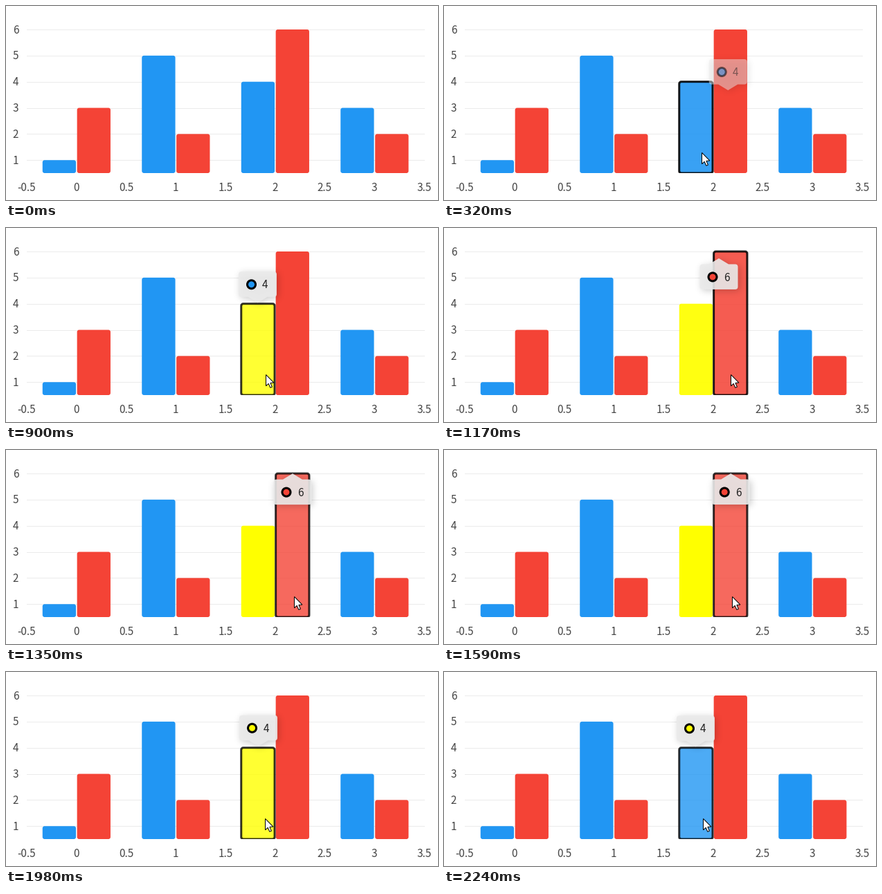
A matplotlib script for the animation above (2350 ms loop, 624 by 281 pixels).

```python
import numpy as np
import matplotlib.pyplot as plt
from matplotlib.animation import FuncAnimation
from matplotlib.patches import Circle, FancyBboxPatch, PathPatch, Polygon, Rectangle
from matplotlib.path import Path
from matplotlib.transforms import Affine2D

W, H, DPI = 624, 281, 100
LOOP, STEP = 2350, 10
PX = 72 / DPI
BLUE, RED, YELLOW = "#2196f3", "#f44336", "#ffff00"
FADE = 340

# Pointer and hover timeline, in ms
ENTER, TO_RED, TO_FIRST = 243, 1067, 1733
CLICKS = [(690, 780), (2140, 2240)]
POINTER = np.array([
    (20, 482, 270), (120, 437, 246), (240, 389, 219), (320, 372, 211.5),
    (460, 375, 212), (960, 375, 212), (1060, 396, 212), (1170, 413.5, 212),
    (1300, 416.5, 212), (1690, 416.5, 212), (1735, 388, 213),
    (1790, 376.5, 213), (1900, 374.5, 212.5),
])
TIP_START, TIP_FIRST, TIP_RED = map(np.array, [(437, 93), (336, 63.3), (386.7, 34)])

fig = plt.figure(figsize=(W / DPI, H / DPI), dpi=DPI, facecolor="white")
ax = fig.add_axes([0, 0, 1, 1])
ax.axis("off")
ax.set_xlim(0, W)
ax.set_ylim(H, 0)


def x_pos(value):
    return 30 + 143.5 * (value + 0.5)


def y_pos(value):
    return 34 + 37.85 * (6 - value)


def label(x, y, text, color="#464646", **style):
    return ax.text(x, y + 5.6, text, ha="center", va="baseline", color=color,
                   fontfamily="Noto Sans CJK JP", fontsize=15.3 * PX, **style)


for value in range(1, 7):
    ax.plot([30, 604], [y_pos(value)] * 2, color="#ebebeb", lw=PX, zorder=1)
    label(14, y_pos(value), str(value))
for value in np.arange(-0.5, 3.6, 0.5):
    label(x_pos(value), 262.5, f"{value:g}")

plot_area = Rectangle((0, 0), W, 242, transform=ax.transData)


def add_bar(index, value, offset, color):
    top = y_pos(value)
    bar = FancyBboxPatch((x_pos(index) + offset, top), 48.3, 242 - top,
                         boxstyle="round,pad=0,rounding_size=3",
                         fc=color, ec="none", lw=3 * PX, zorder=2)
    ax.add_patch(bar)
    bar.set_clip_path(plot_area)
    return bar


first_bars = [add_bar(i, v, -49, BLUE) for i, v in enumerate([1, 5, 4, 3])]
second_bars = [add_bar(i, v, 0.9, RED) for i, v in enumerate([3, 2, 6, 2])]
first_bar, red_bar = first_bars[2], second_bars[2]

# Tooltip balloon: rounded box with a pointer below, or above when flipped
TIP_W, BOX_H, TIP_H, R = 55, 36.5, 45, 4


def balloon(up):
    mid = TIP_W / 2
    points = [(R, 0), (TIP_W - R, 0), (TIP_W, 0), (TIP_W, R),
              (TIP_W, BOX_H - R), (TIP_W, BOX_H), (TIP_W - R, BOX_H),
              (mid + 14, BOX_H), (mid, TIP_H), (mid - 14, BOX_H),
              (R, BOX_H), (0, BOX_H), (0, BOX_H - R),
              (0, R), (0, 0), (R, 0), (R, 0)]
    M, L, C, E = Path.MOVETO, Path.LINETO, Path.CURVE3, Path.CLOSEPOLY
    codes = [M, L, C, C, L, C, C, L, L, L, L, C, C, L, C, C, E]
    if up:
        points = [(x, TIP_H - y) for x, y in points]
    return Path(points, codes)


MARGIN, SIGMA = 18, 5


def shadow_image(path):
    xs, ys = np.meshgrid(np.arange(TIP_W + 2 * MARGIN) + 0.5 - MARGIN,
                         np.arange(TIP_H + 2 * MARGIN) + 0.5 - MARGIN)
    inside = path.contains_points(np.column_stack([xs.ravel(), ys.ravel()]))
    mask = inside.reshape(xs.shape).astype(float)
    kernel = np.exp(-0.5 * (np.arange(-15, 16) / SIGMA) ** 2)
    kernel /= kernel.sum()
    for axis in (0, 1):
        mask = np.apply_along_axis(np.convolve, axis, mask, kernel, mode="same")
    image = np.zeros(mask.shape + (4,))
    image[..., 3] = mask * 0.2
    return image


balloons = {up: balloon(up) for up in (False, True)}
shadows = {up: shadow_image(path) for up, path in balloons.items()}

shadow = ax.imshow(shadows[False], aspect="auto", interpolation="bilinear", zorder=5)
ax.set_xlim(0, W)
ax.set_ylim(H, 0)
tooltip = ax.add_patch(PathPatch(balloons[False], fc="#ebebeb", ec="none", zorder=6))
marker = ax.add_patch(Circle((0, 0), 6, fc=BLUE, ec="black", lw=3 * PX, zorder=7))
tip_text = label(0, 0, "4", "#232323", zorder=7)

halo = ax.add_patch(Circle((0, 0), 12, fc=YELLOW, ec="none", alpha=120 / 255, zorder=8))
ARROW = np.array([(0, 0), (0, 16.3), (3.7, 12.9), (6.3, 18.8), (8.9, 17.7),
                  (6.4, 11.9), (11.4, 11.6)])
arrow = ax.add_patch(Polygon(ARROW, fc="white", ec="black", lw=PX, zorder=9))


def ease(t, start):
    p = np.clip((t - start) / FADE, 0, 1)
    return 1 - (1 - p) ** 3


def set_hover(bar, hovered, opacity):
    bar.set_edgecolor("black" if hovered else "none")
    bar.set_alpha(opacity)
    bar.set_zorder(3 if hovered else 2)


def place_tooltip(corner, up, opacity):
    x, y = corner
    box_top = y + (TIP_H - BOX_H if up else 0)
    tooltip.set_path(balloons[up])
    tooltip.set_transform(Affine2D().translate(x, y) + ax.transData)
    tooltip.set_alpha(0.9 * opacity)
    shadow.set_data(shadows[up])
    left, top = x - MARGIN + 2, y - MARGIN + 2
    shadow.set_extent((left, left + TIP_W + 2 * MARGIN, top + TIP_H + 2 * MARGIN, top))
    shadow.set_alpha(opacity)
    marker.center = (x + 18.5, box_top + 18.5)
    marker.set_alpha(opacity)
    tip_text.set_position((x + 38.5, box_top + 18.5 + 5.6))
    tip_text.set_alpha(opacity)


def draw(frame):
    t = frame * STEP
    enter, to_red, to_first = (ease(t, s) for s in (ENTER, TO_RED, TO_FIRST))
    on_red = TO_RED <= t < TO_FIRST

    toggled = CLICKS[0][0] <= t < CLICKS[1][0]
    first_bar.set_facecolor(YELLOW if toggled else BLUE)
    set_hover(first_bar, t >= ENTER and not on_red,
              1 - 0.2 * (enter - to_red + to_first))
    set_hover(red_bar, on_red, 1 - 0.2 * (to_red - to_first))

    if t < TO_RED:
        corner = TIP_START + (TIP_FIRST - TIP_START) * enter
        color, text = BLUE, "4"
    elif on_red:
        corner = TIP_FIRST + (TIP_RED - TIP_FIRST) * to_red
        color, text = RED, "6"
    else:
        corner = TIP_RED + (TIP_FIRST - TIP_RED) * to_first
        color, text = YELLOW, "4"
    marker.set_facecolor(color)
    tip_text.set_text(text)
    place_tooltip(corner, on_red, enter)

    px, py = (np.interp(t, POINTER[:, 0], POINTER[:, k]) for k in (1, 2))
    arrow.set_xy(ARROW + (round(px) + 0.5, round(py) + 0.5))
    arrow.set_visible(t >= POINTER[0, 0])
    halo.center = (px, py)
    halo.set_visible(any(down <= t < up for down, up in CLICKS))
    return []


anim = FuncAnimation(fig, draw, frames=LOOP // STEP, interval=STEP,
                     repeat=True, repeat_delay=0)
plt.show()
```
